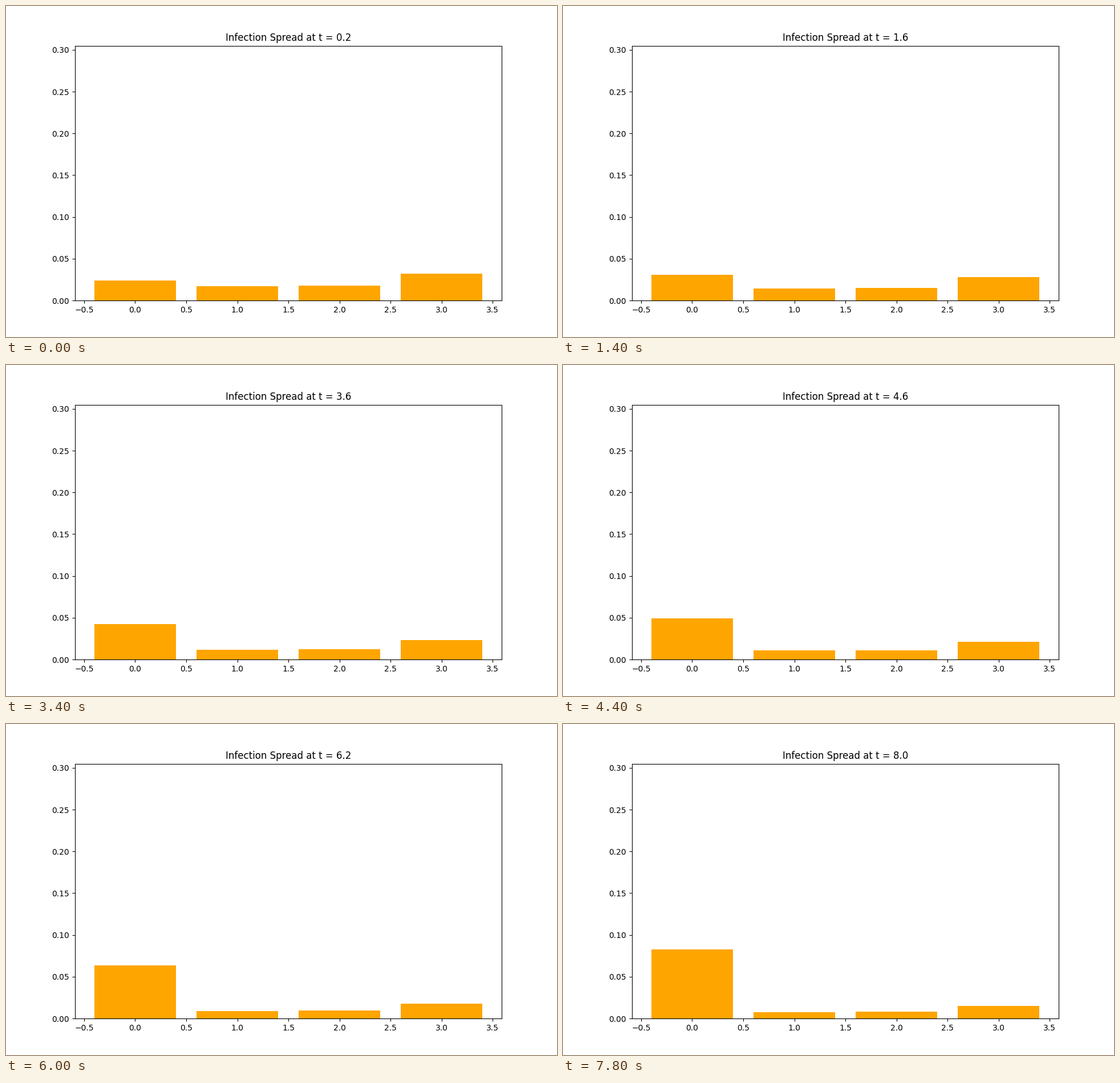
A matplotlib script that plays this animation: 966 by 580 pixels, repeating every 8000 ms.

```python
import numpy as np
import matplotlib.pyplot as plt
from matplotlib.animation import FuncAnimation

FRAMES = 40
STEP_MS = 200
DT = 0.2
Y_MAX = 0.3049
PX_PER_UNIT = 1464.7

# The first node follows logistic growth, the others decay.
CAPACITY, ODDS, GROWTH = 0.414, 16.1, 0.178
DECAY_START = np.array([24.9, 25.75, 47.5]) / PX_PER_UNIT
DECAY_RATE = np.array([0.101, 0.101, 0.0985])


def levels(elapsed):
    growing = CAPACITY / (1 + ODDS * np.exp(-GROWTH * elapsed))
    fading = DECAY_START * np.exp(-DECAY_RATE * elapsed)
    return [growing, *fading]


plt.rcParams["font.family"] = "DejaVu Sans"
fig, ax = plt.subplots(figsize=(9.66, 5.8), dpi=100)
bars = ax.bar(range(4), levels(0), color="orange")
ax.set_xlim(-0.59, 3.59)
ax.set_ylim(0, Y_MAX)
title = ax.set_title("")


def update(i):
    for bar, height in zip(bars, levels(i * DT)):
        bar.set_height(height)
    title.set_text(f"Infection Spread at t = {(i + 1) * DT:.1f}")
    return [*bars, title]


anim = FuncAnimation(fig, update, frames=FRAMES, interval=STEP_MS,
                     init_func=lambda: update(0), repeat=True,
                     repeat_delay=0, blit=False)
plt.show()
```
